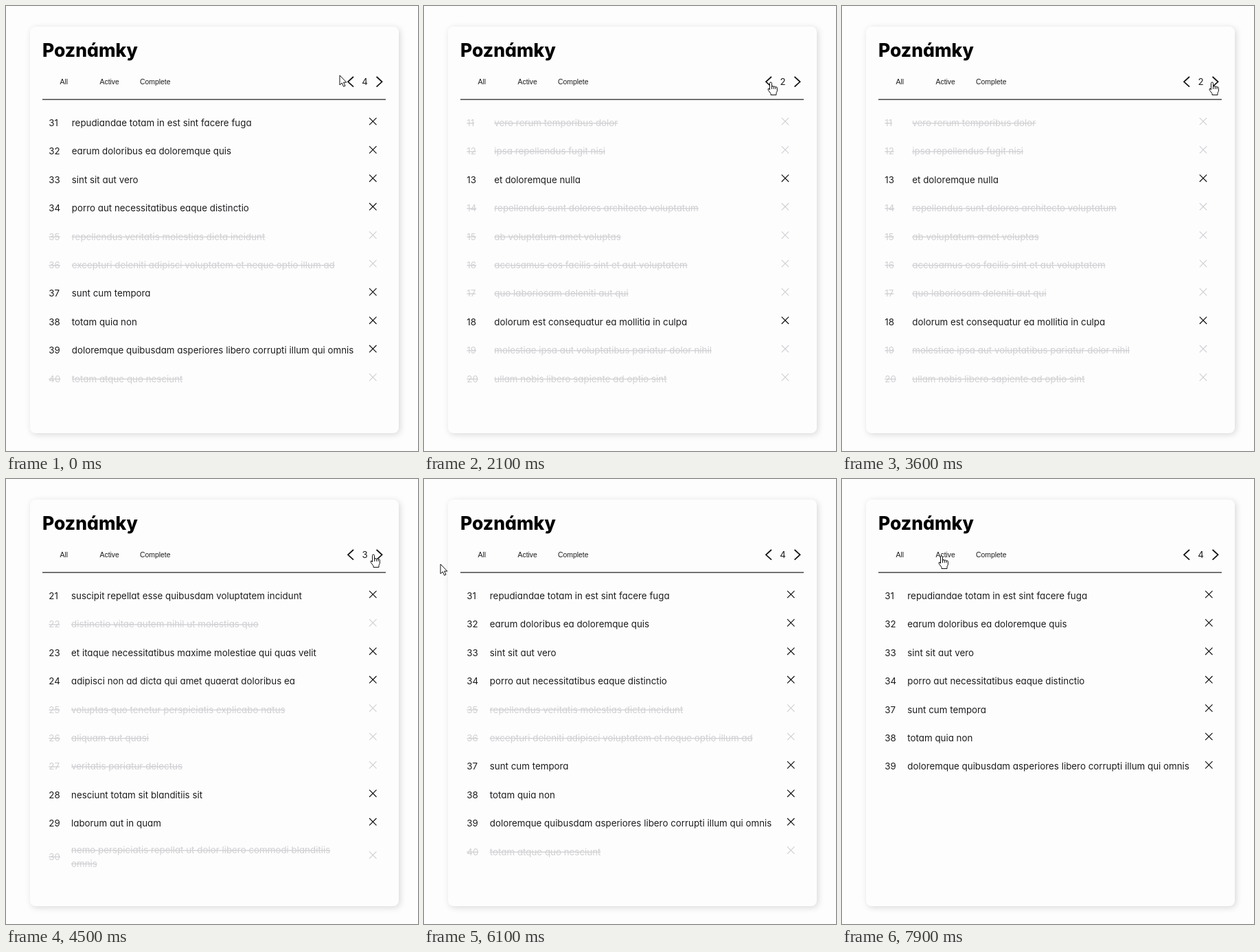
Recreate the animation shown at these times as an HTML page. Size 600 by 648 pixels, loop 8000 ms.

```html
<!DOCTYPE html>
<html lang="cs">
<head>
<meta charset="utf-8">
<title>Poznámky</title>
<style>
  html, body { margin: 0; width: 100%; height: 100%; overflow: hidden; background: #fefdfe; }
  #card { position: absolute; left: 35px; top: 30px; width: 537px; height: 592px; border-radius: 8px;
    background: #fefdfe; box-shadow: 2px 2px 10px rgba(0, 0, 0, .15); }
  svg { position: absolute; left: 0; top: 0; }
  /* cv11: single-storey a */
  text { font: 13.35px Inter, sans-serif; font-feature-settings: "cv11"; fill: #1c1c1e; white-space: pre; }
  .title { font-size: 26.5px; font-weight: 800; fill: #000; }
  .tab { font: 10.4px "Liberation Sans", Arial, sans-serif; }
  .line { fill: none; stroke: #111; stroke-width: 1.2; }
  .done text { fill: #d0d0d3; text-decoration: line-through; }
  .done .line { stroke: #d0d0d3; }
  .cursor { fill: #fff; stroke: #111; stroke-width: 1; stroke-linejoin: round; }
</style>
</head>
<body>
<div id="card"></div>
<svg width="600" height="648" viewBox="0 0 600 648">
  <text class="title" x="53" y="74">Poznámky</text>
  <text class="tab" x="78.5" y="114">All</text>
  <text class="tab" x="136.5" y="114">Active</text>
  <text class="tab" x="195" y="114">Complete</text>
  <path class="line" style="stroke-width:1.7" d="M506 103L498 110.3L506 117.6M539.6 103L547.6 110.3L539.6 117.6"/>
  <text id="number" x="522.5" y="115" text-anchor="middle"></text>
  <path class="line" style="stroke:#222" d="M53 136.2H553"/>
  <g id="list"></g>
  <g id="cursor" class="cursor">
    <path id="arrow" d="M0 0V14L3.2 11L5.6 16.3L8 15.2L5.6 10.2H9.8Z"/>
    <path id="hand" d="M-1.5 11V1.5Q-1.5 0 0 0T1.5 1.5V7Q1.5 5.6 3 5.6T4.3 7Q4.5 6 5.7 6T7 7.6Q7.3 6.8 8.2 6.8T9.4 8.2V12Q9.4 13.5 8 15.7V18.5H0V16.5L-3.8 11.3Q-4.4 9.2 -3 9ZM1.5 7V10M4.3 7V10M7 7.6V10"/>
  </g>
</svg>
<script>
const $ = id => document.getElementById(id);

// "~" marks a completed note, "|" a line break
const pages = {
  1: { textX: 95, crossX: 532.5, notes: [
    'delectus aut autem', 'quis ut nam facilis et officia qui', 'fugiat veniam minus',
    '~et porro tempora', 'laboriosam mollitia et enim quasi adipisci quia provident illum',
    'qui ullam ratione quibusdam voluptatem quia omnis', 'illo expedita consequatur quia in',
    '~quo adipisci enim quam ut ab', 'molestiae perspiciatis ipsa',
    '~illo est ratione doloremque quia maiores aut'] },
  2: { textX: 102.3, crossX: 526, notes: [
    '~vero rerum temporibus dolor', '~ipsa repellendus fugit nisi', 'et doloremque nulla',
    '~repellendus sunt dolores architecto voluptatum', '~ab voluptatum amet voluptas',
    '~accusamus eos facilis sint et aut voluptatem', '~quo laboriosam deleniti aut qui',
    'dolorum est consequatur ea mollitia in culpa',
    '~molestiae ipsa aut voluptatibus pariatur dolor nihil',
    '~ullam nobis libero sapiente ad optio sint'] },
  3: { textX: 95, crossX: 534.3, notes: [
    'suscipit repellat esse quibusdam voluptatem incidunt',
    '~distinctio vitae autem nihil ut molestias quo',
    'et itaque necessitatibus maxime molestiae qui quas velit',
    'adipisci non ad dicta qui amet quaerat doloribus ea',
    '~voluptas quo tenetur perspiciatis explicabo natus', '~aliquam aut quasi',
    '~veritatis pariatur delectus', 'nesciunt totam sit blanditiis sit', 'laborum aut in quam',
    '~nemo perspiciatis repellat ut dolor libero commodi blanditiis|omnis'] },
  4: { textX: 95.8, crossX: 534.3, notes: [
    'repudiandae totam in est sint facere fuga', 'earum doloribus ea doloremque quis',
    'sint sit aut vero', 'porro aut necessitatibus eaque distinctio',
    '~repellendus veritatis molestias dicta incidunt',
    '~excepturi deleniti adipisci voluptatem et neque optio illum ad',
    'sunt cum tempora', 'totam quia non',
    'doloremque quibusdam asperiores libero corrupti illum qui omnis',
    '~totam atque quo nesciunt'] }
};

// [start time, page, active notes only]
const views = [[0, 4], [1400, 3], [1900, 2], [2400, 1], [3500, 2], [4100, 3], [4700, 4], [7600, 4, true]];

// [time, x, y] of the pointer tip
const track = [[0, 486, 101], [400, 505, 111], [2400, 505, 111], [3200, 539, 111],
  [4100, 539, 111], [4500, 535, 110], [5500, 535, 110], [6100, 24, 124], [6300, 61, 118],
  [6500, 82, 115], [7000, 82, 115], [7500, 145, 112], [8000, 145, 112]];

// horizontal extents of the clickable controls
const buttons = [[64, 105], [122, 178], [182, 252], [494, 512], [533, 552]];

const label = (x, y, s) => `<text x="${x}" y="${y}">${s}</text>`;

function listMarkup(page, activeOnly) {
  const { textX, crossX, notes } = pages[page];
  return notes
    .map((note, i) => ({ id: page * 10 - 9 + i, done: note[0] === '~', lines: note.replace('~', '').split('|') }))
    .filter(note => !(activeOnly && note.done))
    .map(({ id, done, lines }, row) => {
      const y = 175 + row * 41.4;
      const wrapped = lines.length > 1;
      const middle = wrapped ? y + 7 : y;
      const text = lines.map((s, i) => label(textX - (activeOnly ? .5 : 0), y + (wrapped ? 19.5 * i - 2.3 : 0), s));
      return `<g class="${done ? 'done' : ''}">${label(62.3, middle, id)}${text.join('')}
        <path class="line" d="M${crossX - 5.2} ${middle - 12.2}l10.4 10.4m0-10.4l-10.4 10.4"/></g>`;
    }).join('');
}

function pointerAt(t) {
  const next = track.findIndex(key => key[0] > t);
  const [t0, x0, y0] = track[next - 1], [t1, x1, y1] = track[next];
  const p = (t - t0) / (t1 - t0), ease = p * p * (3 - 2 * p);
  return [x0 + (x1 - x0) * ease, y0 + (y1 - y0) * ease];
}

let shown;
function draw(now) {
  const t = Math.floor(now % 8000 / 100) * 100;
  const view = views.findLast(v => v[0] <= t);
  if (view !== shown) {
    shown = view;
    $('number').textContent = view[1];
    $('list').innerHTML = listMarkup(view[1], view[2]);
  }
  const [x, y] = pointerAt(t);
  const over = y > 98 && y < 123 && buttons.some(([a, b]) => x >= a && x <= b);
  $('cursor').setAttribute('transform', `translate(${x} ${y})`);
  $('hand').style.display = over ? '' : 'none';
  $('arrow').style.display = over ? 'none' : '';
}

function frame() {
  draw(performance.now());
  requestAnimationFrame(frame);
}
frame();
</script>
</body>
</html>
```
